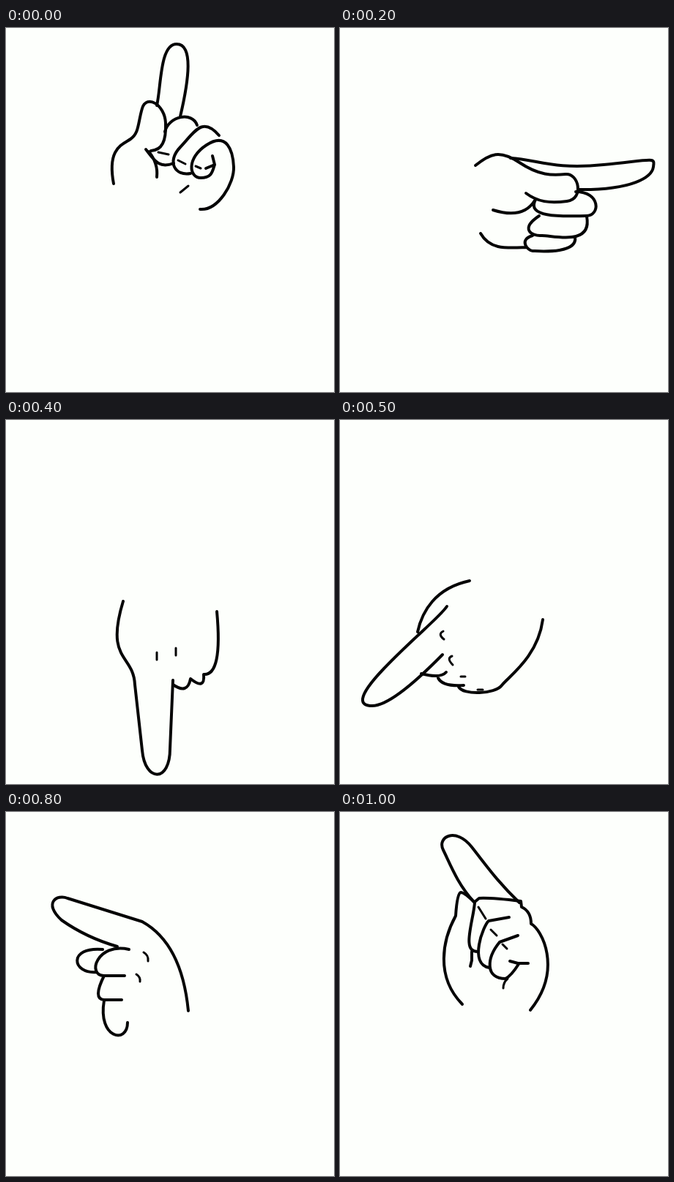
These frames come from a looping animation (448 px wide and 498 px high, 1100 ms). An HTML page without scripts:

```html
<!DOCTYPE html>
<html lang="en">
<head>
<meta charset="utf-8">
<title>Pointing hand</title>
<style>
html, body { margin: 0; width: 100%; height: 100%; overflow: hidden; background: #fdfffc; }
svg { display: block; width: 100%; height: 100%; }
path { fill: none; stroke: #050505; stroke-width: 4; stroke-linecap: round; stroke-linejoin: round; }
.thin { stroke-width: 3; }
/* eleven poses, one tenth of a second each */
g { visibility: hidden; animation: pose 1.1s step-end infinite; animation-delay: calc((var(--i) - 11) * 100ms); }
@keyframes pose {
  0% { visibility: visible; }
  9.0909%, 100% { visibility: hidden; }
}
</style>
</head>
<body>
<svg viewBox="0 0 448 498">
  <!-- up -->
  <g style="--i:0">
    <path d="M206 106C212 80 210 22 233 22S250 70 238 121"/>
    <path d="M147 213C138 165 158 160 170 152S180 130 186 110S217 105 218 130S213 167 198 168"/>
    <path d="M191 166C202 180 208 193 229 185M206 204Q208 185 195 169"/>
    <path d="M217 142C222 120 255 114 261 133M252 199C231 203 219 183 238 163S268 120 291 147"/>
    <path d="M265 248C290 250 312 212 311 190S302 142 274 160S250 205 266 205S282 195 285 187l-3-12m3 12l-12 5"/>
    <path class="thin" d="M208 170l14 3M235 181l10 5M259 189l7 3M238 225l11-9"/>
  </g>
  <!-- up right -->
  <g style="--i:1">
    <path d="M225 128C255 115 300 88 340 66S390 90 340 108L276 148"/>
    <path d="M163 226C155 180 192 165 206 134S290 185 212 176"/>
    <path d="M251 152C300 130 310 180 240 182M290 168C330 165 300 215 262 216S245 190 264 184"/>
    <path d="M306 192C335 205 265 275 254 240M255 247L214 270M206 214Q228 216 241 190"/>
  </g>
  <!-- right -->
  <g style="--i:2">
    <path d="M185 188C205 172 218 166 245 184S290 202 308 200S334 234 310 237S270 238 254 226"/>
    <path d="M233 178C270 180 290 194 360 187S430 176 428 190S400 222 325 221"/>
    <path d="M322 224C356 224 356 257 336 257S252 262 267 235M209 249Q250 262 266 236"/>
    <path d="M272 257C245 275 262 285 275 284S345 300 337 258"/>
    <path d="M192 281C205 304 228 301 255 300M263 284C243 290 257 305 263 305S325 310 321 286"/>
  </g>
  <!-- down right -->
  <g style="--i:3">
    <path d="M259 238C295 245 298 285 313 303S350 366 367 389S363 421 345 415S295 370 277 336"/>
    <path d="M242 257C246 295 270 300 277 315S270 345 250 334S227 300 214 293M197 293Q205 302 221 299"/>
    <path d="M167 274Q160 302 178 326M189 327C165 318 182 356 197 373Q205 380 222 375"/>
    <path d="M212 308C175 325 208 340 221 376L259 388Q268 386 271 375M220 301C204 315 234 340 237 358Q270 382 294 368"/>
    <path class="thin" d="M201 371l11-5M224 371l8-4M248 356l10-5"/>
  </g>
  <!-- down -->
  <g style="--i:4">
    <path d="M160 248C135 330 174 320 176 362L186 452C190 496 224 496 224 450L228 356"/>
    <path d="M228 362Q248 376 252 354Q272 370 270 348Q296 350 288 262"/>
    <path class="thin" d="M206 318v10M232 312v10"/>
  </g>
  <!-- down left -->
  <g style="--i:5">
    <path d="M177 220C130 230 112 262 106 290M146 255C136 270 100 298 60 340S28 391 44 391S90 372 140 321"/>
    <path d="M111 347Q137 354 145 345M134 353Q140 365 169 363M162 365C168 377 212 375 221 363S270 325 277 273"/>
    <path class="thin" d="M141 289q-8 4 1 11M153 323q-8 3 1 12M165 351h6M188 369h7"/>
  </g>
  <!-- left, slightly down -->
  <g style="--i:6">
    <path d="M176 206Q130 222 60 258C-6 280 10 318 60 296L140 264"/>
    <path d="M122 273C108 300 132 312 147 298M130 305Q132 330 160 324M146 328C170 375 255 315 266 278"/>
    <path class="thin" d="M132 236q7 6 2 14M150 282l10-4M160 306l10-3"/>
  </g>
  <!-- left -->
  <g style="--i:7">
    <path d="M175 181C150 180 140 183 95 185S58 205 67 216Q72 222 78 222L148 223"/>
    <path d="M128 225C112 229 72 264 118 261M134 226C112 230 112 270 130 264Q138 261 145 261"/>
    <path d="M129 265C126 290 125 306 158 301M137 303C138 325 134 338 160 338S222 330 252 283"/>
    <path class="thin" d="M158 196h13M126 196q8 8 1 16M146 237l12-7M151 246l12-3M152 277l13-4M157 287h13M181 311q-5 4-3 9"/>
  </g>
  <!-- left, slightly up -->
  <g style="--i:8">
    <path d="M152 184Q110 172 76 148C50 124 70 112 84 118L186 150Q240 180 249 272"/>
    <path d="M132 188C84 184 90 222 124 219M168 188C124 178 110 224 134 224H162"/>
    <path d="M134 224Q118 256 134 257H158M134 258C125 310 166 318 166 288"/>
    <path class="thin" d="M188 192q7 4 6 12M178 222q6 4 5 10"/>
  </g>
  <!-- up left -->
  <g style="--i:9">
    <path d="M157 143C125 122 102 100 102 80S118 70 125 74S200 114 222 131S255 190 246 262"/>
    <path d="M145 152L122 153C98 153 98 185 125 188M142 181C141 148 142 150 183 154M124 208C125 182 140 180 173 184"/>
    <path d="M158 207C115 206 118 225 128 247S150 280 154 260Q154 253 159 244M141 240l19 4M153 268l2 18"/>
    <path class="thin" d="M202 160q7 3 7 12M192 186q5 4 4 10M176 211q5 2 6 8"/>
  </g>
  <!-- nearly up -->
  <g style="--i:10">
    <path d="M183 123C160 98 150 70 141 52S158 20 180 48S215 95 245 124"/>
    <path d="M167 263C130 225 140 175 158 142Q160 110 165 110T184 124C182 150 165 193 189 191"/>
    <path d="M184 123L190 118Q205 117 247 122L248 130Q261 136 261 153C275 160 305 215 260 271"/>
    <path d="M231 144L203 149C196 155 175 208 204 213M243 169L218 178C200 200 198 228 226 228Q234 224 244 208"/>
    <path d="M232 204l11 3h14M180 191v12l-2 8"/>
    <path class="thin" d="M189 130l10 16M206 161l8 8M222 181l6 6M229 228q-6 5-6 13"/>
  </g>
</svg>
</body>
</html>
```
